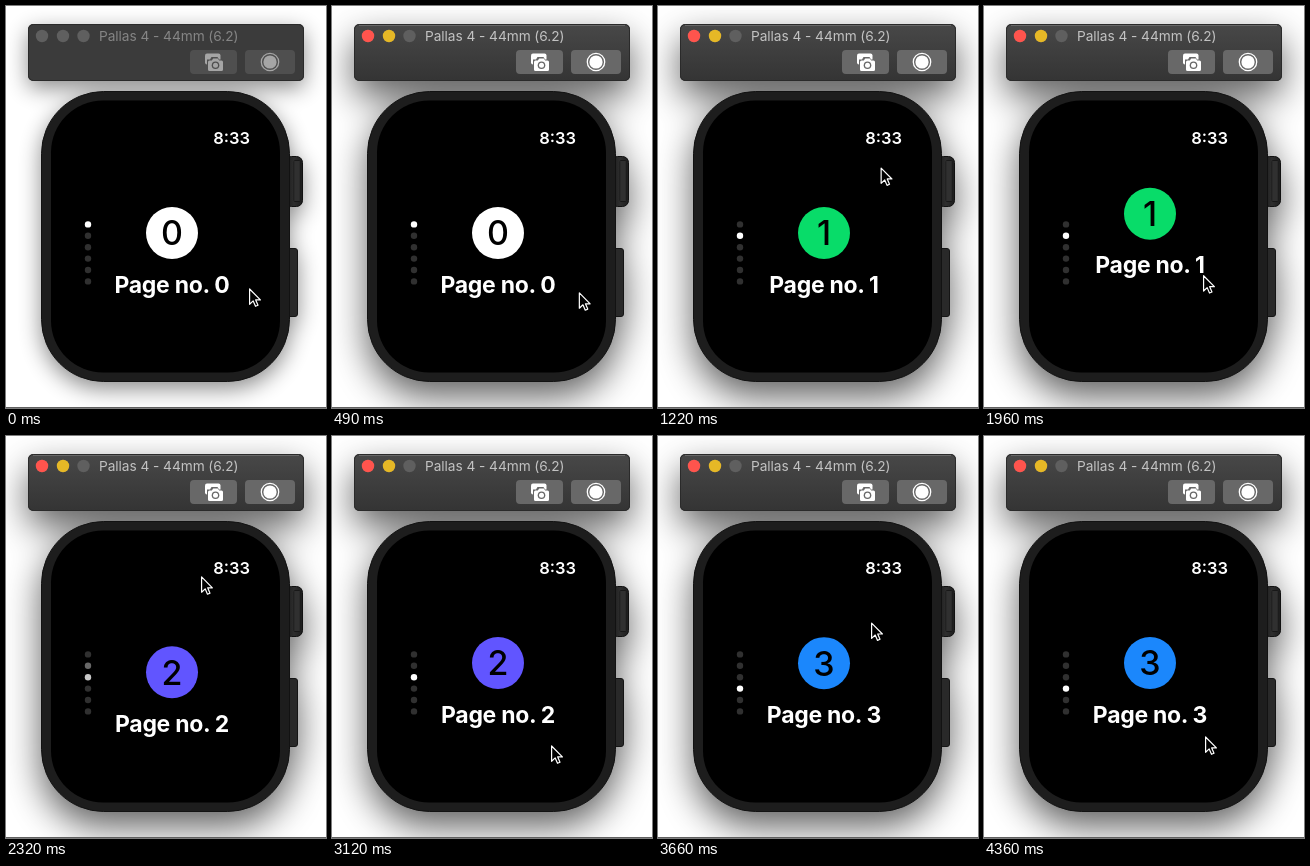
Write an HTML page that moves like this. It is 320 by 402 pixels and loops after 4.4 s.

```html
<!DOCTYPE html>
<html lang="en">
<head>
<meta charset="utf-8">
<title>Watch pager</title>
<style>
  html, body { margin: 0; width: 100%; height: 100%; overflow: hidden; background: #fff; }
  svg { display: block; width: 100%; height: 100%; font-family: Inter, Roboto, sans-serif; }
  .idle { display: none; }
  .inactive .idle { display: inline; }
  .inactive .focus { display: none; }
  .bar { fill: url(#bar); }
  .inactive .bar { fill: #3b3b3b; }
  .title { fill: #c2c2c2; font-size: 13.7px; letter-spacing: -.05px; }
  .inactive .title { fill: #858585; }
  .btn { fill: #686868; }
  .inactive .btn { fill: #4f4f4f; }
  .icon { color: #fff; }
  .inactive .icon { color: #a5a5a5; }
  .light { fill: #5f5f5f; }
  .label { fill: #fff; font-size: 23px; font-weight: 700; letter-spacing: -.3px; text-anchor: middle; }
  .digit { fill: #000; font-size: 34px; font-weight: 500; text-anchor: middle; }
  .clock { fill: #fff; font-size: 16.5px; font-weight: 600; text-anchor: end; }
</style>
</head>
<body>
<svg id="stage" viewBox="0 0 320 402">
  <defs>
    <linearGradient id="bar" x1="0" y1="0" x2="0" y2="1">
      <stop offset="0" stop-color="#484848"/>
      <stop offset="1" stop-color="#343434"/>
    </linearGradient>
    <linearGradient id="crown" x1="0" y1="0" x2="1" y2="0">
      <stop offset="0" stop-color="#1b1b1b"/>
      <stop offset=".5" stop-color="#2e2e2e"/>
      <stop offset="1" stop-color="#1d1d1d"/>
    </linearGradient>
    <filter id="wide" filterUnits="userSpaceOnUse" x="-80" y="-80" width="480" height="580">
      <feGaussianBlur stdDeviation="18"/>
    </filter>
    <filter id="soft" filterUnits="userSpaceOnUse" x="-80" y="-80" width="480" height="580">
      <feGaussianBlur stdDeviation="11"/>
    </filter>
    <clipPath id="view"><rect x="45" y="149" width="229" height="199"/></clipPath>
    <g id="shape">
      <rect x="22" y="18" width="276" height="57" rx="6"/>
      <rect x="35" y="85" width="249" height="291" rx="62"/>
      <rect x="279" y="150" width="18" height="51" rx="6"/>
      <rect x="280" y="242" width="12" height="69" rx="3"/>
    </g>
  </defs>

  <rect width="320" height="402" fill="#fff"/>
  <use href="#shape" class="focus" y="15" opacity=".62" filter="url(#wide)"/>
  <use href="#shape" class="idle" y="7" opacity=".45" filter="url(#soft)"/>
  <rect y="401" width="320" height="1" fill="#606060"/>

  <rect class="bar" x="22" y="18" width="276" height="57" rx="5"/>
  <rect x="22.5" y="18.5" width="275" height="56" rx="5" fill="none" stroke="#2a2a2a"/>
  <path class="focus" d="M27 19.5H293" stroke="#686868"/>
  <circle class="light" cx="36" cy="30" r="6.2"/>
  <circle class="light" cx="57" cy="30" r="6.2"/>
  <circle class="light" cx="77.5" cy="30" r="6.2"/>
  <g class="focus">
    <circle cx="36" cy="30" r="6.2" fill="#ff544d"/>
    <circle cx="57" cy="30" r="6.2" fill="#e6b826"/>
  </g>
  <text class="title" x="93" y="35">Pallas 4 - 44mm (6.2)</text>

  <rect class="btn" x="184" y="44" width="47" height="24" rx="4"/>
  <rect class="btn" x="239" y="44" width="50" height="24" rx="4"/>
  <g class="icon">
    <rect x="199" y="47.500" width="15.500" height="11" rx="2" fill="currentColor"/>
    <g class="btn">
      <path d="M201 53.500h3l1.500-2.500h6l1.500 2.500h5.500V67H201z"/>
    </g>
    <path d="M203.500 54.500h2.300l1.400-2h4.600l1.400 2h2.300q1.500 0 1.500 1.500v7.500q0 1.500-1.500 1.500h-12q-1.500 0-1.500-1.500V56q0-1.500 1.500-1.500z" fill="currentColor"/>
    <circle class="btn" cx="209.500" cy="59.300" r="3.800"/>
    <circle cx="209.500" cy="59.300" r="2.500" fill="currentColor"/>
    <circle cx="264" cy="56" r="6.600" fill="currentColor"/>
    <circle cx="264" cy="56" r="8.700" fill="none" stroke="currentColor" stroke-width="1.300"/>
  </g>

  <rect x="279.500" y="150.500" width="17" height="50" rx="6" fill="url(#crown)" stroke="#111"/>
  <rect x="287.500" y="154" width="7" height="42" rx="2" fill="#181818"/>
  <path d="M291 155.500V195" stroke="#494949" stroke-width="5.500" stroke-dasharray="1 1"/>
  <rect x="280.500" y="242.500" width="11" height="68" rx="2.500" fill="#292929" stroke="#151515"/>
  <rect x="35.500" y="85.500" width="248" height="290" rx="62" fill="#1d1d1d" stroke="#121212"/>
  <rect x="45" y="94.500" width="229" height="272" rx="52" fill="#000"/>

  <text class="clock" x="244" y="138">8:33</text>
  <g clip-path="url(#view)"><g id="pages"></g></g>
  <g id="dots"></g>
  <path id="cursor" d="M.6 1V16.300L4.200 12.900 6.500 18.300 9 17.200 6.700 11.900H11.400Z" fill="#000" stroke="#fff" stroke-width="1.200" stroke-linejoin="round"/>
</svg>
<script>
const LOOP = 4400, PAGE = 199, SETTLE = 320, FADE = 220, FOCUS_AT = 330;
const colors = ['#ffffff', '#08dc69', '#6155ff', '#1b87fc'];
const drags = [
  { press: 560, release: 840 },
  { press: 1850, release: 2160 },
  { press: 3200, release: 3380 }
];
// time, x, y of the pointer tip
const path = [
  [0, 243, 282], [300, 245, 285], [560, 247, 286], [760, 223, 175], [840, 216, 135],
  [980, 212, 118], [1120, 216, 130], [1350, 232, 220], [1470, 237, 272], [1600, 224, 285],
  [1850, 220, 288], [1960, 219, 269], [2160, 205, 165], [2320, 195, 140], [2420, 194, 136],
  [2560, 198, 165], [2860, 215, 270], [3000, 219, 304], [3120, 219, 309], [3200, 220, 309],
  [3380, 215, 190], [3480, 212, 172], [3660, 213, 186], [3850, 218, 235], [4100, 220, 290],
  [4260, 221, 300], [4400, 221, 300]
];

const $ = id => document.getElementById(id);
const stage = $('stage'), pages = $('pages'), cursor = $('cursor');
const clamp = v => Math.max(0, Math.min(1, v));

function add(parent, tag, attrs, text = '') {
  const el = document.createElementNS('http://www.w3.org/2000/svg', tag);
  for (const key in attrs) el.setAttribute(key, attrs[key]);
  el.textContent = text;
  return parent.appendChild(el);
}

colors.forEach((fill, i) => {
  const g = add(pages, 'g', { transform: `translate(166 ${i * PAGE})` });
  add(g, 'circle', { cy: 227, r: 26, fill });
  add(g, 'text', { class: 'digit', y: 239.4 }, i);
  add(g, 'text', { class: 'label', y: 286.7 }, `Page no. ${i}`);
});
const dots = Array.from({ length: 6 }, (_, i) =>
  add($('dots'), 'circle', { cx: 82, cy: 218.4 + i * 11.4, r: 3.2 }));

const slope = (i, k) => (path[i + 1][k] - path[i][k]) / (path[i + 1][0] - path[i][0]);

function tangent(i, k) {
  if (i === 0 || i === path.length - 1) return 0;
  const a = slope(i - 1, k), b = slope(i, k);
  return a * b > 0 ? 2 * a * b / (a + b) : 0;
}

// Monotone cubic through the path points
function pointer(t, k) {
  let i = 0;
  while (i < path.length - 2 && t >= path[i + 1][0]) i++;
  const h = path[i + 1][0] - path[i][0], u = (t - path[i][0]) / h, v = 1 - u;
  return path[i][k] * (1 + 2 * u) * v * v + path[i + 1][k] * u * u * (3 - 2 * u)
    + h * u * v * (tangent(i, k) * v - tangent(i + 1, k) * u);
}

function scrollAt(t) {
  return drags.reduce((sum, { press, release }) => {
    if (t < press) return sum;
    const pulled = pointer(press, 2) - pointer(Math.min(t, release), 2);
    const left = (1 - clamp((t - release) / SETTLE)) ** 3;
    return sum + (t < release ? pulled : PAGE - (PAGE - pulled) * left);
  }, 0);
}

function draw(t) {
  stage.classList.toggle('inactive', t < FOCUS_AT);
  pages.setAttribute('transform', `translate(0 ${-scrollAt(t)})`);
  cursor.setAttribute('transform', `translate(${pointer(t, 1)} ${pointer(t, 2)})`);
  const at = drags.reduce((sum, d) => sum + clamp((t - d.release) / FADE), 0);
  dots.forEach((dot, i) => {
    const c = Math.round(48 + 207 * clamp(1 - Math.abs(at - i)));
    dot.setAttribute('fill', `rgb(${c},${c},${c})`);
  });
}

const start = performance.now();
function tick() {
  draw((performance.now() - start) % LOOP);
  requestAnimationFrame(tick);
}
draw(0);
requestAnimationFrame(tick);
</script>
</body>
</html>
```
